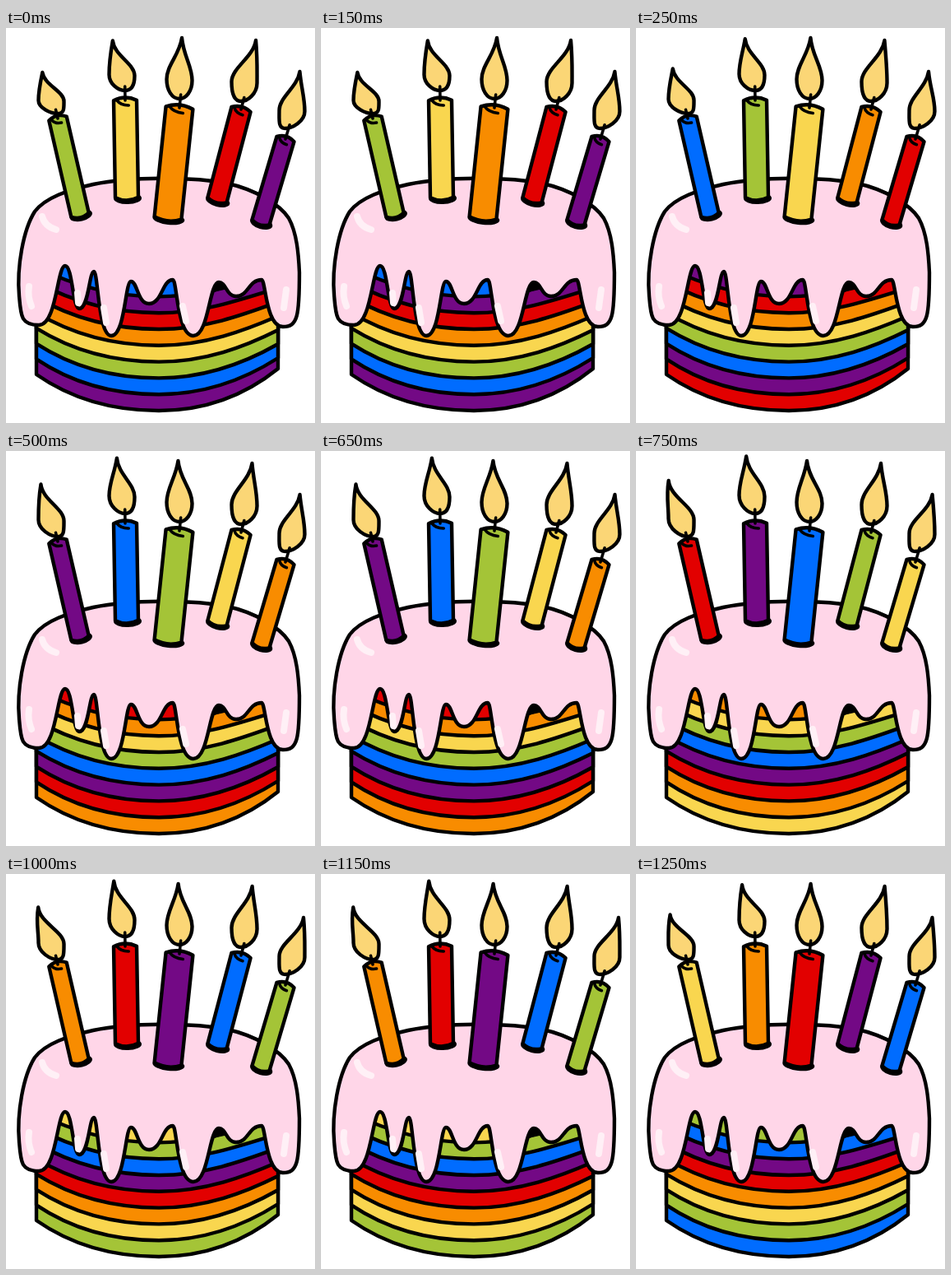
Animation of 376 by 480 pixels, one loop 1500 ms. Source, as an HTML page:

```html
<!DOCTYPE html>
<html>
<head>
<meta charset="utf-8">
<title>Birthday cake</title>
<style>
html, body { margin: 0; width: 100%; height: 100%; overflow: hidden; background: #fff; }
svg { display: block; width: 376px; height: 480px; }
</style>
</head>
<body>
<svg id="cake" viewBox="0 0 376 480" fill="none" stroke="#000" stroke-width="4.4" stroke-linejoin="round" stroke-linecap="round"></svg>
<script>
const COLORS = ['#e20000', '#f88c00', '#f9d64f', '#a4c437', '#006cff', '#730985'];
const STEP = 250, COUNT = COLORS.length;
const cake = document.getElementById('cake');

function add(tag, attrs, parent = cake) {
  const el = document.createElementNS('http://www.w3.org/2000/svg', tag);
  for (const key in attrs) el.setAttribute(key, attrs[key]);
  return parent.appendChild(el);
}

// Cake layers, bottom first; each one covers the top of the last.
const layers = [];
for (let n = 0; n < 8; n++) {
  const left = 421 - 18.7 * n, mid = 465 - 19.8 * n, right = 414 - 17 * n + (n && 4);
  layers.push(add('path', {
    d: `M37 270V${left}C80 ${mid - 14} 130 ${mid} 186 ${mid}S290 ${mid - 18} 331 ${right}V270Z`
  }));
}
add('path', { d: 'M250 320Q252 310 270 313Z', fill: '#000' });

// Icing: a dome, then drips as [wall x, next turn x, next turn y].
const drips = [
  [316, 311, 306], [295, 280, 326], [268, 259, 309], [247, 228, 374], [208, 203, 306], [190, 174, 335],
  [160, 152, 308], [145, 128, 374], [112, 107, 296], [101, 89, 341], [81, 72, 289], [62, 40, 361]
];
let icing = 'M40 361C18 361 18 350 16 325C13 290 21 245 35 223C48 206 75 197 106 190C150 181 225 180 270 189' +
  'C302 196 333 214 344 231C354 249 356 275 357 297C357 350 355 363 337 363', turnY = 363;
for (const [wall, x, y] of drips) {
  icing += `C${wall} ${turnY} ${wall} ${y} ${x} ${y}`;
  turnY = y;
}
add('path', { d: icing + 'Z', fill: '#ffd6e8' });
add('path', {
  d: 'M44 229Q47 241 61 245M28 314Q26 326 31 338M87 322L88 334M119 340L122 358M215 338L219 356M341 318L338 340',
  stroke: '#fff0f6', 'stroke-width': 8
});

// top, foot: ends of the stick; tip: resting flame tip; bottom: flame base; dip, phase: flicker
const candles = [
  { top: [63, 110], foot: [90, 227], w: 22, tip: [42, 45], bottom: 104, dip: 9, phase: .9 },
  { top: [145, 88], foot: [147, 206], w: 28, tip: [132, 11], bottom: 76, dip: 4.5, phase: -.8 },
  { top: [211, 97], foot: [197, 231], w: 33, tip: [211, 12], bottom: 86, dip: 0, phase: 1.6 },
  { top: [286, 99], foot: [257, 209], w: 24, tip: [301, 15], bottom: 89, dip: 0, phase: 1.6 },
  { top: [340, 135], foot: [310, 236], w: 22, tip: [359, 53], bottom: 122, dip: 0, phase: -2.6 }
];

for (const c of candles) {
  const [tx, ty] = c.top, [fx, fy] = c.foot, half = c.w / 2;
  const len = Math.hypot(tx - fx, ty - fy), angle = Math.atan2(tx - fx, fy - ty) * 180 / Math.PI;
  c.fire = add('path', { fill: '#fbd676' });
  const g = add('g', { transform: `translate(${fx} ${fy}) rotate(${angle})` });
  add('ellipse', { cx: 1, cy: 1, rx: half + 3, ry: 7, fill: '#000', stroke: 'none' }, g);
  c.stick = add('path', { d: `M${-half} ${-len}q${half} -7 ${c.w} 0V0Q0 7 ${-half} 0Z` }, g);
  add('path', { d: `M${-half * .7} ${-len}q${half * .3} 6 ${half} 6M0 ${-len}V${c.bottom - ty - len - 5}`, 'stroke-width': 3.6 }, g);
}

function flamePath(x, y, mid, base, bottom) {
  const l = mid - 15.5, r = mid + 15.5, up = f => bottom - f * (bottom - y);
  return `M${x} ${y}C${x + 2} ${up(.7)} ${r} ${up(.54)} ${r} ${up(.3)}` +
    `C${r} ${up(.12)} ${base + 8} ${bottom} ${base} ${bottom}` +
    `C${base - 9} ${bottom} ${l} ${up(.14)} ${l} ${up(.32)}` +
    `C${l} ${up(.55)} ${x - 3} ${up(.72)} ${x} ${y}Z`;
}

function draw(time) {
  const k = Math.floor(time / STEP) % COUNT, turn = k / COUNT * 2 * Math.PI;
  layers.forEach((el, n) => el.setAttribute('fill', COLORS[(11 - n + k) % COUNT]));
  candles.forEach((c, i) => {
    const x = c.tip[0] + 3 * Math.sin(turn + c.phase), y = c.tip[1] + c.dip * Math.cos(turn);
    c.stick.setAttribute('fill', COLORS[(9 - i + k) % COUNT]);
    c.fire.setAttribute('d', flamePath(x, y, c.top[0] + 4 * (i - 2), c.top[0], c.bottom));
  });
}

const start = performance.now();
function tick() {
  draw(performance.now() - start);
  requestAnimationFrame(tick);
}
tick();
</script>
</body>
</html>
```
